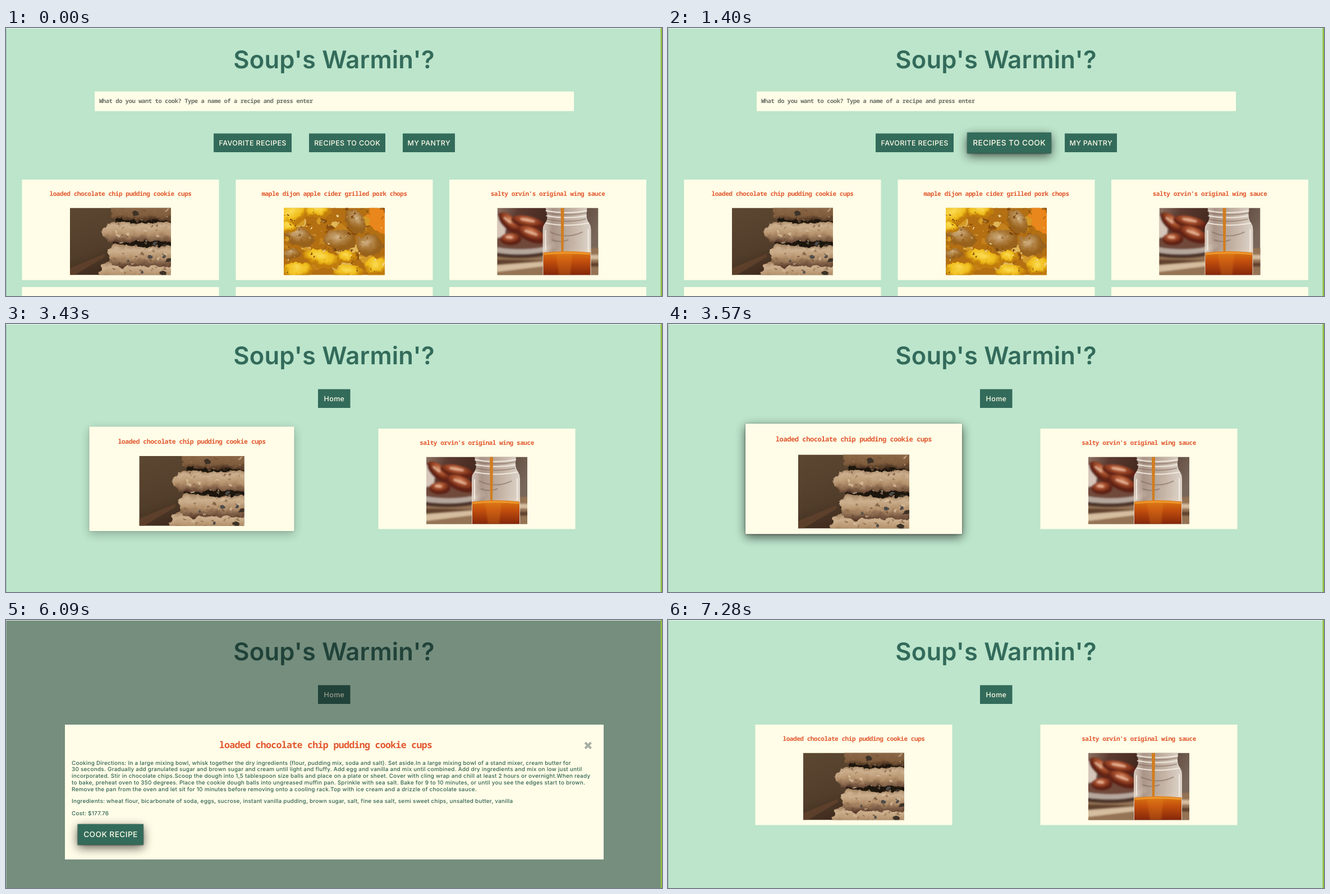
An HTML page for the animation above (8000 ms loop, 1169 by 479 pixels).

```html
<!DOCTYPE html>
<html lang="en">
<head>
<meta charset="utf-8">
<title>Recipes</title>
<style>
html, body { margin: 0; width: 100%; height: 100%; overflow: hidden; background: #bce5cb; }
#stage { display: block; width: 1169px; height: 479px; }
text { font-family: Inter, "Open Sans", sans-serif; font-optical-sizing: none; text-rendering: geometricPrecision; }
.mid { text-anchor: middle; }
.mono { font-family: "Noto Sans Mono", "DejaVu Sans Mono", monospace; font-weight: 700; letter-spacing: -.039em; }
.dish { font-size: 11px; fill: #e2582f; }
.label { font-size: 12.5px; font-weight: 550; letter-spacing: .35px; fill: #fffde7; }
.body { font-size: 9.9px; font-weight: 500; letter-spacing: .26px; fill: #2f6153; }
.paper { fill: #fffde7; }
.pine { fill: #336b5b; }
</style>
</head>
<body>
<svg id="stage" viewBox="0 0 1169 479">
  <defs>
    <filter id="soft" x="-50%" y="-100%" width="200%" height="300%"><feGaussianBlur stdDeviation="8"/></filter>
    <filter id="edge" x="-10%" y="-20%" width="120%" height="140%"><feGaussianBlur stdDeviation="1"/></filter>
    <filter id="haze" x="-20%" y="-20%" width="140%" height="140%"><feGaussianBlur stdDeviation="1.6"/></filter>
    <filter id="rough" x="-10%" y="-10%" width="120%" height="120%">
      <feTurbulence type="fractalNoise" baseFrequency=".08" numOctaves="3" seed="4"/>
      <feDisplacementMap in="SourceGraphic" scale="11" xChannelSelector="R" yChannelSelector="G"/>
      <feGaussianBlur stdDeviation=".5"/>
    </filter>
    <linearGradient id="dusk" x2=".5" y2="1"><stop stop-color="#5c4831"/><stop offset=".6" stop-color="#513d2a"/><stop offset="1" stop-color="#3a251a"/></linearGradient>
    <linearGradient id="crust" x2="0" y2="1"><stop stop-color="#9b7a59"/><stop offset=".25" stop-color="#cdb08e"/><stop offset=".6" stop-color="#b3906b"/><stop offset="1" stop-color="#57392a"/></linearGradient>
    <linearGradient id="top" x2="0" y2="1"><stop stop-color="#94704d"/><stop offset=".7" stop-color="#7f5c3d"/><stop offset="1" stop-color="#3f291b"/></linearGradient>
    <radialGradient id="spud" cx=".45" cy=".35"><stop stop-color="#fbdc55"/><stop offset=".65" stop-color="#f0bd1c"/><stop offset="1" stop-color="#c07b08"/></radialGradient>
    <radialGradient id="meat" cx=".4" cy=".35"><stop stop-color="#d0b184"/><stop offset=".6" stop-color="#ab7a3a"/><stop offset="1" stop-color="#99621b"/></radialGradient>
    <radialGradient id="wing" cx=".45" cy=".3"><stop stop-color="#dc9670"/><stop offset=".45" stop-color="#ab512d"/><stop offset="1" stop-color="#5f2012"/></radialGradient>
    <linearGradient id="room" x2="1" y2=".3"><stop stop-color="#8f7466"/><stop offset=".2" stop-color="#5b3a30"/><stop offset=".5" stop-color="#45291f"/><stop offset="1" stop-color="#78665a"/></linearGradient>
    <linearGradient id="sauce" x2="0" y2="1"><stop stop-color="#dc7a12"/><stop offset=".4" stop-color="#c4500d"/><stop offset="1" stop-color="#84260a"/></linearGradient>
    <linearGradient id="glass" x2="1"><stop stop-color="#e8ded2"/><stop offset=".2" stop-color="#b7a294"/><stop offset=".65" stop-color="#d3c4b5"/><stop offset="1" stop-color="#ece4da"/></linearGradient>

    <symbol id="cookies" viewBox="0 0 180 120">
      <path fill="url(#dusk)" d="M0 0h180v120H0z"/>
      <path fill="#65452e" d="M0 108l62-26v6L8 120H0z" opacity=".7"/>
      <g filter="url(#rough)">
        <path fill="#1d130c" d="M82 10h120v117H70l6-40 2-30z"/>
        <path fill="url(#crust)" d="M54 112q4-18 26-17l50 6 70-3v40H50z"/>
        <path fill="url(#crust)" d="M68 82q0-17 18-17l40 5 74-3v38l-56-2-54 3q-22-2-22-24z"/>
        <path fill="url(#crust)" d="M59 46q1-22 24-21l52 3 65-5v39l-56-4-60 5q-25 1-25-17z"/>
        <path fill="url(#top)" d="M72-10h130v31l-60 3-58-4q-12-4-12-18z"/>
        <g id="chips"/>
      </g>
    </symbol>

    <symbol id="chops" viewBox="0 0 180 120">
      <path fill="#b36f12" d="M0 0h180v120H0z"/>
      <g filter="url(#rough)">
        <g id="glaze"/>
        <g fill="url(#meat)">
          <ellipse cx="26" cy="51" rx="29" ry="17" transform="rotate(24 26 51)"/>
          <ellipse cx="128" cy="25" rx="24" ry="16" transform="rotate(55 128 25)"/>
          <ellipse cx="100" cy="58" rx="29" ry="19"/>
          <ellipse cx="152" cy="67" rx="24" ry="20"/>
          <ellipse cx="14" cy="82" rx="16" ry="9"/>
        </g>
        <g fill="url(#spud)">
          <ellipse cx="18" cy="10" rx="34" ry="19" transform="rotate(-25 18 10)"/>
          <ellipse cx="62" cy="6" rx="22" ry="13"/>
          <ellipse cx="7" cy="35" rx="17" ry="10"/>
          <ellipse cx="68" cy="91" rx="34" ry="16" transform="rotate(12 68 91)"/>
          <ellipse cx="112" cy="87" rx="17" ry="12"/>
          <ellipse cx="26" cy="112" rx="27" ry="16"/>
          <ellipse cx="116" cy="115" rx="28" ry="13"/>
          <ellipse cx="165" cy="106" rx="21" ry="18"/>
        </g>
        <ellipse cx="168" cy="21" rx="17" ry="25" fill="#e9861b" transform="rotate(-28 168 21)"/>
        <g id="seeds"/>
      </g>
    </symbol>

    <symbol id="sauces" viewBox="0 0 180 120">
      <path fill="url(#room)" d="M0 0h180v120H0z"/>
      <g filter="url(#haze)">
        <path fill="#957355" d="M-5 83l190-12v54H-5z"/>
        <path fill="#d5bd9f" d="M-5 103l90-7v8l-90 11zM165 84h20v8h-20z"/>
        <path fill="#60432f" d="M-5 92l90 2-90 8zM165 98h20v7h-20z"/>
        <ellipse cx="-2" cy="38" rx="17" ry="24" fill="#d6c6ba"/>
        <ellipse cx="38" cy="73" rx="68" ry="17" fill="#4d342c"/>
        <ellipse cx="38" cy="67" rx="66" ry="16" fill="#b6a79d"/>
        <ellipse cx="40" cy="62" rx="56" ry="12" fill="#70483a"/>
        <g fill="url(#wing)">
          <ellipse cx="22" cy="27" rx="25" ry="12" transform="rotate(42 22 27)"/>
          <ellipse cx="55" cy="26" rx="31" ry="11" transform="rotate(12 55 26)"/>
          <ellipse cx="61" cy="48" rx="28" ry="13" transform="rotate(22 61 48)"/>
          <ellipse cx="24" cy="56" rx="19" ry="11"/>
        </g>
        <path fill="none" stroke="#f0c8ac" stroke-width="3" stroke-linecap="round" d="M13 18l10 8M43 20l22 4M50 41l20 7M17 52l9 1" opacity=".8"/>
      </g>
      <path fill="url(#glass)" d="M86 0h74q-3 18 3 26q4 5 4 14v80H81V40q0-9 5-14q6-8 0-26z" opacity=".88"/>
      <path fill="url(#sauce)" d="M82 80q42-5 84 0v40H82z"/>
      <path fill="#e98a24" d="M104 81h30l-4 39h-20z" opacity=".28" filter="url(#haze)"/>
      <path fill="none" stroke="#f7f0e7" stroke-width="2" d="M86 5q37 7 74 0M87 14q37 7 72 0M86 27q38 8 77 0M86 40v36M162 38v40" opacity=".85"/>
      <path fill="none" stroke="#7d6256" stroke-width="2" d="M87 9q37 7 72 0M88 20q36 8 70 0M94 43q30 14 58 0M97 57q16 6 30 0" opacity=".5"/>
      <path fill="#d17d20" d="M113 0h6l-1 80h-4z"/>
      <path fill="#ee962a" d="M83 81q40-5 82 0v3q-42-4-82 0z"/>
    </symbol>
  </defs>

  <rect width="1169" height="479" fill="#bce5cb"/>
  <text class="mid pine" x="584.5" y="72" font-size="43.5" font-weight="620" letter-spacing=".2">Soup's Warmin'?</text>
  <g id="home">
    <rect class="paper" x="158" y="113.5" width="854" height="35"/>
    <text class="mono" x="166" y="134" font-size="10.45" fill="#6c7067">What do you want to cook? Type a name of a recipe and press enter</text>
  </g>
  <g id="saved"/>
  <g id="modal">
    <rect width="1169" height="479" opacity=".38"/>
    <rect class="paper" x="105" y="187" width="960" height="241"/>
    <text class="mono mid" x="569.5" y="229" font-size="16.5" fill="#e2582f">loaded chocolate chip pudding cookie cups</text>
    <path d="M1032 219l10.5 10.5m0-10.5l-10.5 10.5" stroke="#a9afa4" stroke-width="4.2"/>
  </g>
  <rect width="1" height="479" fill="#a3bcae"/>
  <rect width="1169" height="1" fill="#eef3ee"/>
  <rect x="1166.5" width="2.5" height="479" fill="#93bf41"/>
</svg>
<script>
const LOOP = 8000;
const $ = id => document.getElementById(id);
const add = (id, markup) => $(id).insertAdjacentHTML('beforeend', markup);

// A box that grows around its centre and casts a shadow while hovered.
function box(id, x, y, w, h, cls, inner) {
  const size = `x="${x}" width="${w}" height="${h}"`;
  return `<g id="${id}" data-x="${x + w / 2}" data-y="${y + h / 2}">
    <g class="shade" opacity="0">
      <rect ${size} y="${y + 5}" opacity=".62" filter="url(#soft)"/>
      <rect ${size} y="${y + .5}" opacity=".6" filter="url(#edge)"/>
    </g>
    <rect class="${cls}" ${size} y="${y}"/>${inner}</g>`;
}

const button = (id, x, y, w, label) => box(id, x, y, w, 33.5, 'pine',
  `<text class="label mid" x="${x + w / 2 + .2}" y="${y + 21}">${label}</text>`);

const card = (id, x, y, name, photo) => box(id, x, y, 351, 179.5, 'paper',
  `<text class="mono dish mid" x="${x + 175.5}" y="${y + 29}">${name}</text>
   <use href="#${photo}" x="${x + 85.5}" y="${y + 50.5}" width="180" height="120"/>`);

const cups = 'loaded chocolate chip pudding cookie cups';
const wings = "salty orvin's original wing sauce";

add('home',
  button('favs', 370, 188.5, 139, 'FAVORITE RECIPES') +
  button('toCook', 540, 188.5, 136, 'RECIPES TO COOK') +
  button('pantry', 707, 188.5, 93, 'MY PANTRY') +
  card('a', 28.5, 271, cups, 'cookies') +
  card('b', 409.5, 271, 'maple dijon apple cider grilled pork chops', 'chops') +
  card('c', 790, 271, wings, 'sauces') +
  [28.5, 409.5, 790].map(x => `<rect class="paper" x="${x}" y="463" width="351" height="20"/>`).join(''));

add('saved',
  button('back', 556, 116.5, 57.5, 'Home') +
  card('cupsCard', 155.5, 187, cups, 'cookies') +
  card('wingsCard', 663.5, 187, wings, 'sauces'));

const lines = [
  [258.5, 'Cooking Directions: In a large mixing bowl, whisk together the dry ingredients (flour, pudding mix, soda and salt). Set aside.In a large mixing bowl of a stand mixer, cream butter for'],
  [270.3, '30 seconds. Gradually add granulated sugar and brown sugar and cream until light and fluffy. Add egg and vanilla and mix until combined. Add dry ingredients and mix on low just until'],
  [282.1, 'incorporated. Stir in chocolate chips.Scoop the dough into 1,5 tablespoon size balls and place on a plate or sheet. Cover with cling wrap and chill at least 2 hours or overnight.When ready'],
  [293.9, 'to bake, preheat oven to 350 degrees. Place the cookie dough balls into ungreased muffin pan. Sprinkle with sea salt. Bake for 9 to 10 minutes, or until you see the edges start to brown.'],
  [305.7, 'Remove the pan from the oven and let sit for 10 minutes before removing onto a cooling rack.Top with ice cream and a drizzle of chocolate sauce.'],
  [327.3, 'Ingredients: wheat flour, bicarbonate of soda, eggs, sucrose, instant vanilla pudding, brown sugar, salt, fine sea salt, semi sweet chips, unsalted butter, vanilla'],
  [349, 'Cost: $177.76']
];
add('modal',
  lines.map(([y, s]) => `<text class="body" x="117" y="${y}">${s}</text>`).join('') +
  button('cook', 133, 366.5, 106.5, 'COOK RECIPE'));

let seed = 7;
const rand = () => (seed = seed * 16807 % 2147483647) / 2147483647;

// Scatters small blobs over a photo.
function scatter(id, n, x, w, r, colors) {
  let s = '';
  for (let i = 0; i < n; i++) {
    const k = r * (.4 + rand());
    s += `<ellipse cx="${x + rand() * w}" cy="${rand() * 120}" rx="${k * 1.4}" ry="${k}" fill="${colors[i % colors.length]}"/>`;
  }
  add(id, s);
}
scatter('chips', 90, 78, 102, 1.6, ['#6a4b33aa', '#dcc4a2aa', '#8b6a4aaa']);
scatter('chips', 10, 82, 98, 3, ['#4d4b48', '#3c3028']);
scatter('glaze', 70, 0, 180, 6, ['#d59a25', '#8c4f0c', '#c5821a', '#e0b658']);
scatter('seeds', 110, 0, 180, 1, ['#6f3d0b', '#8a520d', '#efd9a0']);

// [time, amount of hover]
const hovers = {
  toCook: [[1260, .4], [1330, .9], [1400, 1]],
  cupsCard: [[3430, .4], [3500, .9], [3570, 1], [4270, .4], [4340, 0]],
  cook: [[6020, .7], [6090, 1], [7210, 0]]
};

const show = (id, on) => $(id).setAttribute('visibility', on ? 'visible' : 'hidden');

function draw(t) {
  show('home', t < 1960);
  show('saved', t >= 1960);
  show('modal', t >= 4270 && t < 7210);
  for (const id in hovers) {
    const k = hovers[id].reduce((v, [at, amount]) => t >= at ? amount : v, 0);
    const g = $(id), { x, y } = g.dataset;
    g.setAttribute('transform', `translate(${x} ${y}) scale(${1 + .1 * k}) translate(${-x} ${-y})`);
    g.querySelector('.shade').setAttribute('opacity', k);
  }
}

function tick() {
  draw(performance.now() % LOOP);
  requestAnimationFrame(tick);
}
tick();
</script>
</body>
</html>
```
